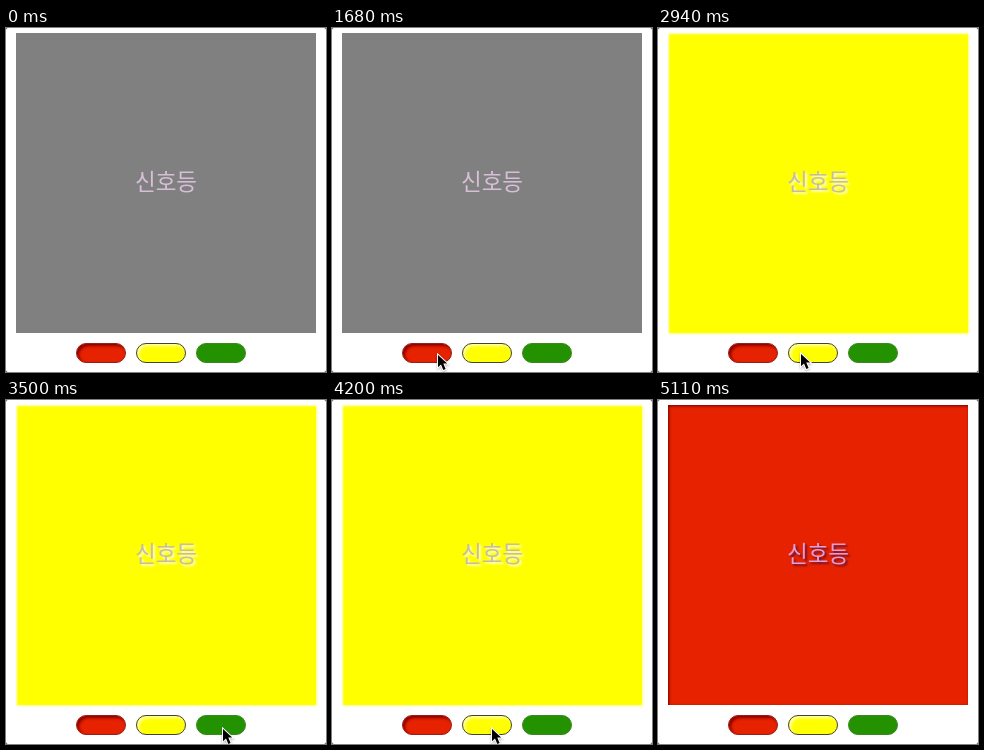
Animation of 320 by 344 pixels, one loop 5.46 s. Source, as an HTML page:

```html
<!DOCTYPE html>
<html lang="ko">
<head>
<meta charset="utf-8">
<style>
html, body { margin: 0; width: 100%; height: 100%; overflow: hidden; background: #333; }
#page { position: absolute; left: 0; top: 0; width: 320px; height: 344px; border-radius: 2px; background: #fff; overflow: hidden; }
#lamp {
  position: absolute; left: 10px; top: 5px; width: 300px; height: 300px;
  background: #808080; color: #d8bfd8; text-align: center;
  font: 500 22.5px/294px "Noto Sans CJK KR", "Noto Sans CJK", sans-serif;
}
#lamp.red { background: #e62200; color: #dda0dd; box-shadow: inset 1px 1px 3px #700; text-shadow: 2px 2px 2px #72102c; }
#lamp.yellow { background: #ff0; color: #c6bcae; box-shadow: inset 1px 1px 2px #ffffd8, 1px 1px 2px #ffff80; text-shadow: 2px 2px 2px #ffffe4; }
#lamp.green { background: #249200; color: #d3c3d0; }
.btn { position: absolute; top: 315px; box-sizing: border-box; width: 50px; height: 20px; border-radius: 10px; }
.btn.red { left: 70px; background: #e62200; border: 1px solid #98201a; box-shadow: inset 2px 2px 3px #8b0000; }
.btn.yellow { left: 130px; background: #ff0; border: 1px solid #444430; box-shadow: inset 2px 2px 3px #ffffa8; }
.btn.green { left: 190px; background: #249200; border: 1px solid #3a8a22; }
#cursor { position: absolute; left: 0; top: 0; filter: drop-shadow(0 1px 1px rgba(0,0,0,.3)); }
</style>
</head>
<body>
<div id="page">
  <div id="lamp">신호등</div>
  <div class="btn red"></div>
  <div class="btn yellow"></div>
  <div class="btn green"></div>
  <svg id="cursor" width="14" height="20">
    <path d="M1 2V14.2L4 11.4L6.3 16.9L8.6 15.9L6.3 10.5H10.2Z" stroke="#fff" stroke-width="2" paint-order="stroke"/>
  </svg>
</div>
<script>
const LOOP = 5460, STEP = 70;
const lamp = document.getElementById('lamp');
const cursor = document.getElementById('cursor');

// [time, lamp colour]
const clicks = [[0, ''], [2240, 'red'], [2870, 'yellow'], [3570, 'green'], [4130, 'yellow'], [4760, 'red']];

// [time, x, y] of the pointer tip
const path = [
  [140, 150, 346], [560, 107, 326], [770, 105, 325], [840, 105, 325],
  [1050, 110, 296], [1260, 105, 325], [1330, 105, 325], [1540, 104, 325],
  [1610, 104, 325], [1680, 105, 325], [1890, 122, 303], [2170, 101, 323],
  [2380, 101, 323], [2730, 142, 324], [3010, 142, 324], [3500, 216, 327],
  [3710, 216, 327], [3920, 160, 327], [3990, 159, 327], [4270, 159, 327],
  [4690, 95, 325], [4830, 95, 325], [5110, 90, 346]
];

const ease = u => u * u * (3 - 2 * u);

function pointerAt(t) {
  const i = path.findIndex(p => p[0] > t);
  if (i < 1) return null;
  const [t0, x0, y0] = path[i - 1], [t1, x1, y1] = path[i];
  const u = ease((t - t0) / (t1 - t0));
  return [x0 + (x1 - x0) * u, y0 + (y1 - y0) * u].map(Math.round);
}

function draw(now) {
  const t = Math.floor(now % LOOP / STEP) * STEP;
  lamp.className = clicks.filter(c => c[0] <= t).pop()[1];
  const pos = pointerAt(t);
  cursor.style.visibility = pos ? 'visible' : 'hidden';
  if (pos) cursor.style.transform = `translate(${pos[0]}px, ${pos[1]}px)`;
}

function tick() {
  draw(performance.now());
  requestAnimationFrame(tick);
}
tick();
</script>
</body>
</html>
```
